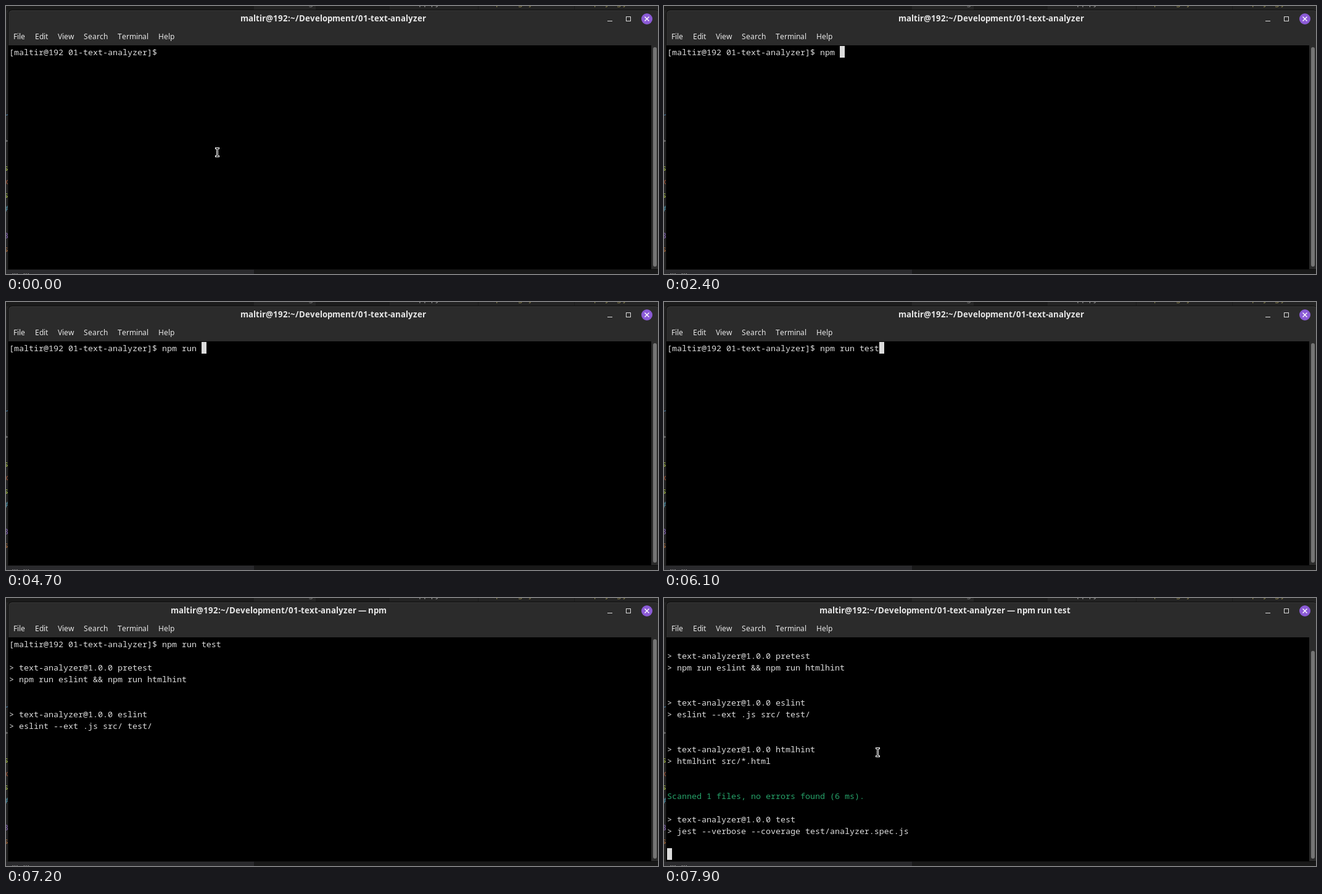
Write an HTML page with a canvas that moves like this. It is 1057 px wide and 436 px high and loops after 8 s.

```html
<!DOCTYPE html>
<html lang="en">
<head>
<meta charset="utf-8">
<title>Terminal</title>
<style>
  html, body { margin: 0; width: 100%; height: 100%; overflow: hidden; background: #1b1b1b; }
  canvas { display: block; }
</style>
</head>
<body>
<canvas id="stage" width="1057" height="436"></canvas>
<script>
const ctx = document.getElementById('stage').getContext('2d');
const LOOP = 8000, CELL = 8, ROW = 19, LEFT = 5, TOP = 65;
const SANS = '"Noto Sans", sans-serif';
const MONO = '13.3333px "Noto Sans Mono", monospace';
const GREEN = '#26a269', TEXT = '#dcdcdc';

const PROMPT = '[maltir@192 01-text-analyzer]$ ';
const COMMAND = 'npm run test';
const PATH = 'maltir@192:~/Development/01-text-analyzer';
const KEYS = [400, 1000, 1700, 2400, 3000, 3500, 4100, 4700, 5000, 5300, 5700, 6100];
const CURSOR_OFF = [[0, 400], [1500, 1700], [2300, 2400], [7000, 7700]];

const task = (name, command) => ['', `> text-analyzer@1.0.0 ${name}`, `> ${command}`, ''];
// Each chunk of output: time it is printed, lines
const OUTPUT = [
  [6500, []],
  [7100, task('pretest', 'npm run eslint && npm run htmlhint')],
  [7200, task('eslint', 'eslint --ext .js src/ test/')],
  [7900, [
    ...task('htmlhint', 'htmlhint src/*.html'), '',
    'Scanned 1 files, no errors found (6 ms).',
    ...task('test', 'jest --verbose --coverage test/analyzer.spec.js')
  ]]
];

function box(x, y, w, h, color) {
  ctx.fillStyle = color;
  ctx.fillRect(x, y, w, h);
}

function text(s, x, y, color, font = MONO) {
  ctx.font = font;
  ctx.fillStyle = color;
  ctx.fillText(s, x, y);
}

// Interface text advances by whole pixels; returns the end position
function label(s, x, y, font) {
  for (const c of s) {
    text(c, x, y, '#e6e6e6', font);
    x += Math.round(ctx.measureText(c).width);
  }
  return x;
}

function line(color, width, ...points) {
  ctx.strokeStyle = color;
  ctx.lineWidth = width;
  ctx.beginPath();
  for (const [x1, y1, x2, y2] of points) {
    ctx.moveTo(x1, y1);
    ctx.lineTo(x2, y2);
  }
  ctx.stroke();
}

function roundBox(x, y, w, h, radii, color) {
  ctx.fillStyle = color;
  ctx.beginPath();
  ctx.roundRect(x, y, w, h, radii);
  ctx.fill();
}

function drawDesktop() {
  box(0, 0, 1057, 436, '#1b1b1b');
  box(0, 7, 4, 422, '#222');
  box(402, 0, 100, 7, '#252525');
  box(622, 0, 435, 7, '#232323');
  box(765, 0, 1, 7, '#1a1a1a');
  box(921, 0, 1, 7, '#1a1a1a');
  const tab = '13px ' + SANS;
  text('testing', 456, -1, '#777', tab);
  text('app.py', 662, -1, '#999', tab);
  text('package.json', 794, -1, '#8d8450', tab);
  text('playing.js', 953, -1, '#8d8450', tab);
  const code = [
    ['~', 182, '#4a90c0'], ['>', 224, '#888'], ['s', 268, '#a6c040'], ['x', 290, '#a05030'],
    ['s', 312, '#a6c040'], ['#', 334, '#4a90a8'], ['3', 378, '#8060b0'], ['s', 400, '#b06a35']
  ];
  for (const [c, y, color] of code) text(c, -4, y, color);
  box(0, 429, 402, 7, '#2a2a2d');
  box(402, 429, 655, 7, '#191919');
  text('.lib.lib', 6, 445, '#bbb', tab);
}

function drawWindow(title, x, thumbTop) {
  roundBox(3, 6, 1056, 423, [7, 7, 0, 0], '#0d0d0d');
  roundBox(4, 7, 1055, 421, [6, 6, 0, 0], '#383838');
  roundBox(4, 8, 1055, 420, [6, 6, 0, 0], '#2b2b2b');
  label(title, x, 25, 'bold 13.3333px ' + SANS);

  let menuX = 12;
  for (const name of ['File', 'Edit', 'View', 'Search', 'Terminal', 'Help']) {
    menuX = label(name, menuX, 54, '12px ' + SANS) + 16;
  }

  line('#ddd', 1, [975, 24.5, 983, 24.5]);
  ctx.strokeRect(1005.5, 17.5, 7, 7);
  roundBox(1030, 12, 18, 18, 9, '#8b5bd6');
  line('#fff', 1.4, [1035.5, 17.5, 1042.5, 24.5], [1042.5, 17.5, 1035.5, 24.5]);

  box(4, 64, 1042, 364, '#000');
  roundBox(1049, thumbTop, 6, 424 - thumbTop, 3, '#747474');
}

function drawPointer(x, y) {
  const shape = (grow, color) => {
    for (const [dx, dy, w, h] of [[-2, -6, 5, 1], [-2, 7, 5, 1], [0, -6, 1, 14]]) {
      box(x + dx - grow, y + dy - grow, w + 2 * grow, h + 2 * grow, color);
    }
  };
  shape(1, '#fff');
  shape(0, '#000');
}

function render(t) {
  const typed = COMMAND.slice(0, KEYS.filter(k => k <= t).length);
  const printed = OUTPUT.filter(([at]) => at <= t);
  const lines = [PROMPT + typed, ...printed.flatMap(([, rows]) => rows)];
  if (printed.length) lines.push('');
  const scroll = Math.max(0, lines.length - 19);

  drawDesktop();
  if (t < 6700) drawWindow(PATH, 380, 67);
  else if (t < 7400) drawWindow(PATH + ' — npm', 267, 67);
  else drawWindow(PATH + ' — npm run test', 252, scroll ? 86 : 67);

  lines.slice(scroll).forEach((s, i) => {
    text(s, LEFT, TOP + i * ROW + 15, s.startsWith('Scanned') ? GREEN : TEXT);
  });

  if (!CURSOR_OFF.some(([from, to]) => t >= from && t < to)) {
    const last = lines.length - 1;
    box(LEFT + lines[last].length * CELL, TOP + (last - scroll) * ROW, CELL, ROW, TEXT);
  }

  if (t < 400) drawPointer(342, 237);
  if (t >= 7900) drawPointer(346, 250);
}

function tick() {
  render(performance.now() % LOOP);
  requestAnimationFrame(tick);
}
tick();
</script>
</body>
</html>
```
